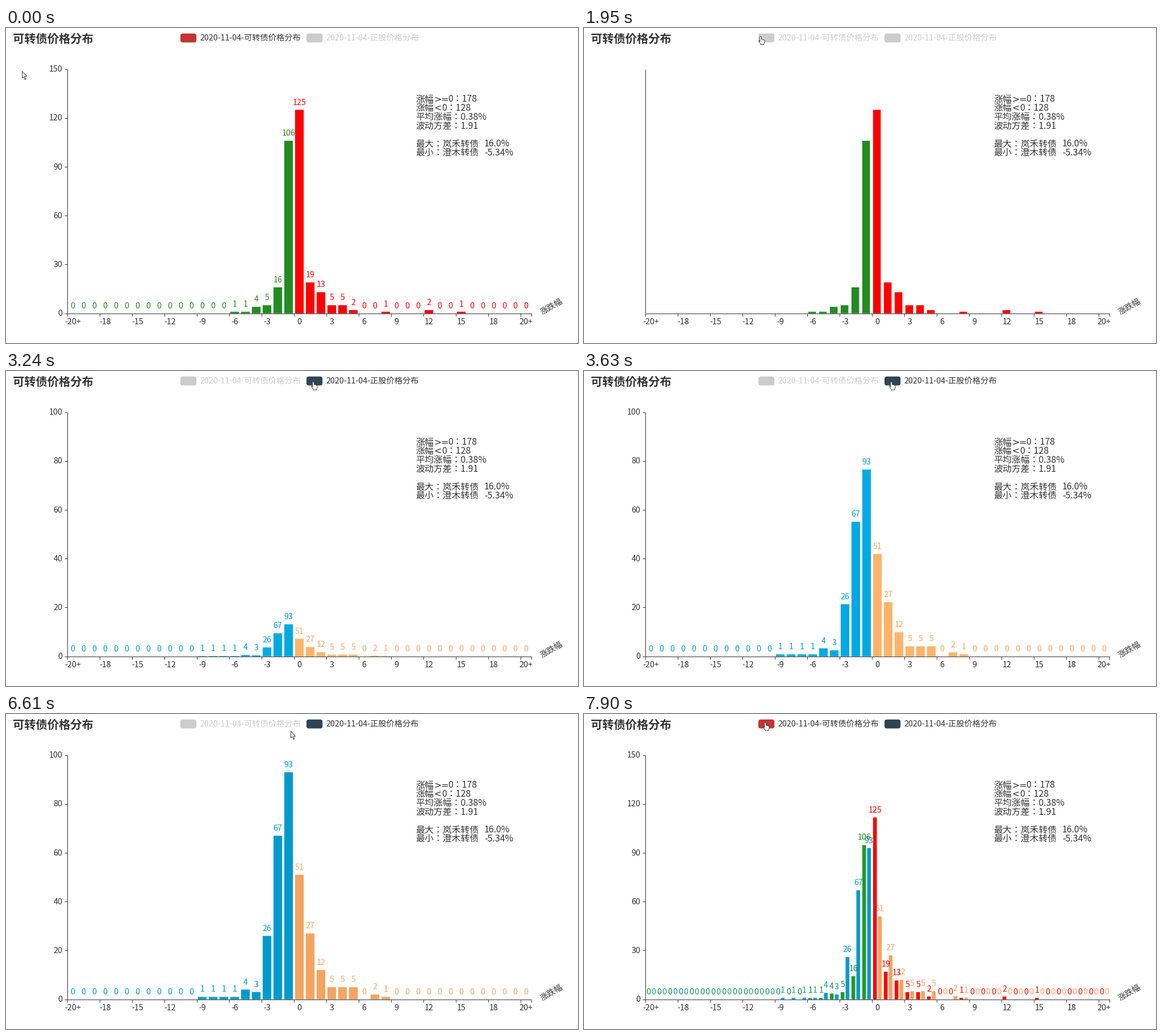
These frames come from a looping animation (1007 by 556 pixels, 8000 ms). A matplotlib script:

```python
import numpy as np
import matplotlib.pyplot as plt
from matplotlib.animation import FuncAnimation
from matplotlib.collections import LineCollection, PolyCollection
from matplotlib.patches import FancyBboxPatch, Polygon

W, H, DPI = 1007, 556, 64
INTERVAL, FRAMES = 40, 200
STEP = 129.5                      # the picture refreshes once per step (ms)
PX = 72 / DPI                     # points per pixel

LEFT, RIGHT, TOP, BASE = 108.0, 925.0, 72.6, 503.7
N, ZERO = 43, 21
BAND = (RIGHT - LEFT) / N
WIDE = BAND * 0.8
THIN = WIDE / 2.3                 # two bars with a 30% gap
INK, OFF = "#333333", "#cccccc"

# Steps at which the legend is clicked, and when the motion starts (ms)
HIDE, SHOW, BOTH = 14, 24, 56
HIDE_MS, SHOW_MS, BOTH_MS = 1931, 3188, 7373

bonds = np.zeros(N, int)
bonds[15:27] = [1, 1, 4, 5, 16, 106, 125, 19, 13, 5, 5, 2]
bonds[[29, 33, 36]] = 1, 2, 1
stocks = np.zeros(N, int)
stocks[12:30] = [1, 1, 1, 1, 4, 3, 26, 67, 93, 51, 27, 12, 5, 5, 5, 0, 2, 1]

# step: (x, y, shape)
CURSOR = {
    0: (28, 76, "arrow"), 4: (18, 69, "arrow"), 5: (70, 42, "arrow"),
    6: (170, 14, "arrow"), 7: (264, 1, "arrow"), 8: (287, 5, "arrow"),
    9: (300, 11, "arrow"), 10: (307, 14, "hand"), 16: (357, 21, "hand"),
    17: (430, 22, "hand"), 18: (495, 23, "hand"), 19: (541, 24, "hand"),
    20: (537, 18, "hand"), 51: (501, 30, "arrow"), 52: (402, 25, "arrow"),
    53: (358, 20, "hand"), 54: (332, 17, "hand"), 55: (315, 14, "hand"),
}
SHAPES = {
    "arrow": np.array([(0.5, 0.5), (0.5, 12.5), (3.2, 10), (5.2, 14.8),
                       (7, 14), (5, 9.4), (8.7, 9.2)]),
    "hand": np.array([(3.2, 1), (4.8, 1), (5.5, 2), (5.5, 6), (7.6, 6.2),
                      (9.4, 6.8), (11, 8), (11, 11.2), (9.6, 14), (9.6, 15.6),
                      (4.2, 15.6), (3.6, 13.6), (0.8, 9.6), (1, 8.3),
                      (2.1, 8.5), (2.8, 9.6), (2.8, 1.8)]),
}

# Rows of the summary, each as (x, text) pieces
SUMMARY = [
    [(721, "涨幅"), (753, ">="), (778, "0：178")],
    [(721, "涨幅"), (753, "<"), (767, "0：128")],
    [(721, "平均涨幅：0.38%")],
    [(721, "波动方差：1.91")],
    [],
    [(721, "最大：岚禾转债"), (842, "16.0%")],
    [(721, "最小：澄木转债"), (842, "-5.34%")],
]

plt.rcParams["font.family"] = ["Noto Sans CJK JP", "DejaVu Sans"]
fig = plt.figure(figsize=(W / DPI, H / DPI), dpi=DPI, facecolor="white")
ax = fig.add_axes([0, 0, 1, 1])
ax.set(xlim=(0, W), ylim=(H, 0))
ax.axis("off")


def put(x, y, s, size=14.3, color=INK, ha="left", **kw):
    """Text whose glyphs are centred vertically on y."""
    return ax.text(x, y + 0.37 * size, s, fontsize=size * PX, color=color,
                   ha=ha, va="baseline", **kw)


def move(text, x, y, size=14.3):
    text.set_position((x, y + 0.37 * size))


def ease(ms, length):
    """Cubic ease-out."""
    return 1 - (1 - np.clip(ms / length, 0, 1)) ** 3


def lift(rgb):
    return np.minimum(np.floor(np.array(rgb) * 1.1), 255)


class Series:
    def __init__(self, values, below, above, z):
        self.values = values
        pick = lambda lo, hi: [np.array(lo if i < ZERO else hi) / 255
                               for i in range(N)]
        self.normal = pick(below, above)
        self.bright = pick(lift(below), lift(above))
        self.bars = PolyCollection([], linewidths=0, zorder=z, snap=False)
        ax.add_collection(self.bars, autolim=False)
        self.labels = [put(0, 0, str(v), color=c, ha="center", zorder=z + 0.5)
                       for v, c in zip(values, self.normal)]

    def hide(self):
        self.bars.set_visible(False)
        for label in self.labels:
            label.set_visible(False)

    def draw(self, shift, width, scale, bright=False, labels=True):
        x0 = LEFT + BAND * (np.arange(N) + 0.1) + shift
        tops = BASE - self.values * scale
        self.bars.set_verts([[(x, BASE), (x, y), (x + width, y), (x + width, BASE)]
                             for x, y in zip(x0, tops)])
        self.bars.set_facecolor(self.bright if bright else self.normal)
        self.bars.set_visible(True)
        for label, x, y in zip(self.labels, x0, tops):
            label.set_visible(labels)
            move(label, x + width / 2, y - 14.2)


class LegendItem:
    def __init__(self, x, name, color):
        self.color = color
        self.icon = ax.add_patch(FancyBboxPatch(
            (x, 9.7), 28.2, 15.8, boxstyle="round,pad=0,rounding_size=4",
            linewidth=0, zorder=6))
        self.text = put(x + 34, 17, name, 14.2)

    def set_on(self, on):
        self.icon.set_facecolor(self.color if on else OFF)
        self.text.set_color(INK if on else OFF)


# Static parts
put(12, 18.5, "可转债价格分布", 20.3, weight="bold")
for row, pieces in enumerate(SUMMARY):
    for x, s in pieces:
        font = "DejaVu Sans" if s[0] in "<>" else "Noto Sans CJK JP"
        put(x, 124.5 + 15.8 * row, s, 15.9, family=font)

for i in range(0, N, 3):
    name = "-20+" if i == 0 else "20+" if i == N - 1 else str(i - ZERO)
    put(LEFT + BAND * (i + 0.5), 518, name, ha="center")
ax.text(960, 492, "涨跌幅", fontsize=14.2 * PX, color=INK, rotation=30,
        ha="center", va="center", rotation_mode="anchor")

ticks_x = [LEFT + BAND * i for i in range(0, N, 3)] + [RIGHT]
axis_lines = [[(LEFT, TOP), (LEFT, BASE)], [(LEFT, BASE), (RIGHT, BASE)]]
axis_lines += [[(x, BASE), (x, BASE + 5)] for x in ticks_x]
ax.add_collection(LineCollection(axis_lines, colors=INK, linewidths=PX, zorder=5),
                  autolim=False)

# Moving parts
y_ticks = LineCollection([], colors=INK, linewidths=PX, zorder=5)
ax.add_collection(y_ticks, autolim=False)
y_labels = [put(99.5, 0, "", ha="right") for _ in range(6)]
bond_series = Series(bonds, (34, 139, 34), (255, 0, 0), 3)
stock_series = Series(stocks, (0, 154, 205), (244, 164, 96), 2)
bond_item = LegendItem(307, "2020-11-04-可转债价格分布", "#c23531")
stock_item = LegendItem(529, "2020-11-04-正股价格分布", "#2f4554")
pointer = ax.add_patch(Polygon([(0, 0), (1, 1), (0, 1)], closed=True, fc="white",
                               ec="#333333", lw=0.9 * PX, zorder=10))


def draw_y_axis(top, old_top=None, p=1.0):
    """Labels up to top; values shared with the old scale slide from it."""
    marks = [] if top is None else [top * i // 5 for i in range(6)]
    lines = []
    for i, label in enumerate(y_labels):
        label.set_visible(bool(marks))
        if marks:
            v = marks[i]
            scale = (BASE - TOP) / top
            if old_top and v % (old_top // 5) == 0 and v <= old_top:
                scale = (BASE - TOP) * ((1 - p) / old_top + p / top)
            y = BASE - v * scale
            label.set_text(str(v))
            move(label, 99.5, y - 0.7)
            lines.append([(LEFT - 5, y), (LEFT, y)])
    y_ticks.set_segments(lines)


def update(frame):
    step = int((frame * INTERVAL + 30) // STEP)
    ms = step * STEP
    full = BASE - TOP

    bond_series.hide()
    stock_series.hide()
    if step < HIDE:
        draw_y_axis(150)
        bond_series.draw(0, WIDE, full / 150, bright=step >= 11)
    elif step < SHOW:
        draw_y_axis(None)
        p = ease(ms - HIDE_MS, 300)
        if p < 1:
            bond_series.draw(0, WIDE * (1 - p), full / 150, labels=False)
    elif step < BOTH:
        draw_y_axis(100)
        grow = ease(ms - SHOW_MS, 1000)
        stock_series.draw(0, WIDE, full / 100 * grow, bright=step < 51)
    else:
        p = ease(ms - BOTH_MS, 300)
        grow = ease(ms - BOTH_MS, 1000)
        draw_y_axis(150, 100, p)
        stock_series.draw((WIDE - THIN) * p, WIDE + (THIN - WIDE) * p,
                          full * ((1 - p) / 100 + p / 150))
        bond_series.draw(0, THIN, full / 150 * grow, bright=True)

    bond_item.set_on(step < HIDE or step >= BOTH)
    stock_item.set_on(step >= SHOW)
    x, y, shape = CURSOR[max(k for k in CURSOR if k <= step)]
    pointer.set_xy(SHAPES[shape] + (x, y))
    return []


anim = FuncAnimation(fig, update, frames=FRAMES, interval=INTERVAL,
                     init_func=lambda: update(0), repeat=True, repeat_delay=0,
                     blit=False)
plt.show()
```
